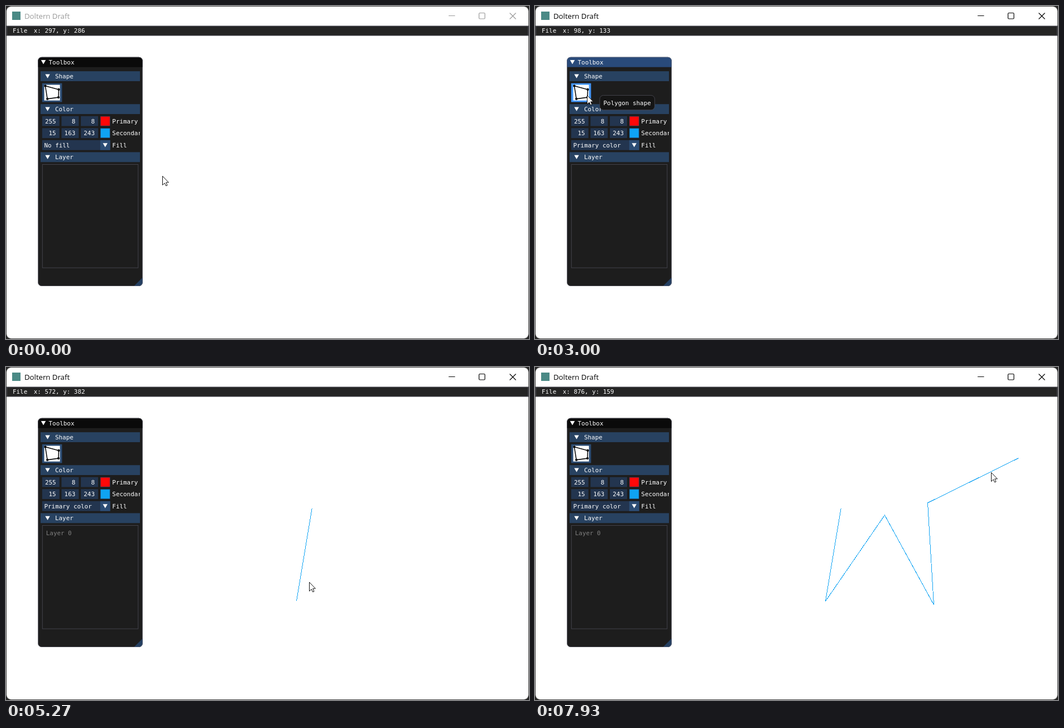
These frames come from a looping animation (937x598 px, 8 s). An HTML page:

```html
<!DOCTYPE html>
<html lang="en">
<head>
<meta charset="utf-8">
<title>Doltern Draft</title>
<style>
  html, body { margin: 0; width: 100%; height: 100%; overflow: hidden; background: #262626; }
  svg { display: block; width: 937px; height: 598px; }
  text { font: 11.63px "DejaVu Sans Mono", "Noto Sans Mono", monospace; fill: #fff; white-space: pre; }
  #chrome text { font: 13.2px "Open Sans", "Noto Sans", sans-serif; fill: currentColor; }
  #chrome { color: #999; }
  #chrome.on { color: #000; }
  .head { fill: #284261; }
  .head.hot { fill: #3b7ece; }
  .field { fill: #23354f; }
  .field.hot { fill: #2c4d75; }
  .btn { fill: #2c4d75; }
  .btn.hot { fill: #4296fa; }
  .edge { fill: none; stroke: rgba(110, 110, 128, .5); }
  .swatch { stroke: rgba(41, 74, 122, .54); }
  .over { fill: #151515; stroke: #46464f; }
  #caption { fill: #0a0a0a; }
  #caption.on { fill: #294a7a; }
  #pick { fill: none; }
  #pick.hot { fill: #397ccc; }
  #pick.down { fill: #4296fa; }
  #layer { fill: #808080; }
  #path { fill: none; stroke: #0fa3f3; shape-rendering: crispEdges; }
  .off { display: none; }
</style>
</head>
<body>
<svg viewBox="0 0 937 598">
  <defs>
    <clipPath id="inner"><rect x="60" y="60" width="195" height="438"/></clipPath>
    <path id="down" fill="#fff" d="M-4.5-3.9h9l-4.5 7.8z"/>
  </defs>
  <rect x="1" y="1" width="935" height="596" rx="8" fill="#fff"/>

  <g id="chrome">
    <rect x="11" y="10" width="15" height="15" fill="#4b8a86"/>
    <text x="33" y="23">Doltern Draft</text>
    <g fill="none" stroke="currentColor" stroke-width="1.2">
      <path d="M793 17.5h11.5M902.5 12.5l11 11M913.5 12.5l-11 11"/>
      <rect x="847.5" y="12.5" width="10.5" height="10.5" rx="1.5"/>
    </g>
  </g>

  <polyline id="path"/>

  <g transform="translate(1 35.6) scale(.9375)">
    <rect width="997.3" height="19" fill="#242424"/>
    <rect class="edge" x=".5" y=".5" width="996.3" height="18"/>
    <text x="11.7" y="13.7">File</text>
    <text id="status" x="52" y="13.7"></text>

    <rect x="60" y="60" width="200" height="438.5" rx="7" fill="#1d1d1d"/>
    <path id="caption" d="M60 79V67a7 7 0 0 1 7-7h186a7 7 0 0 1 7 7v12z"/>
    <path d="M260 482v9.5a7 7 0 0 1-7 7h-9.5z" fill="#243f61"/>
    <rect class="edge" x="60.5" y="60.5" width="199" height="437.5" rx="6.5"/>
    <use href="#down" x="70.4" y="69.5"/>
    <text x="80.6" y="73.7">Toolbox</text>

    <g id="tools" clip-path="url(#inner)"></g>

    <g id="popup">
      <rect class="over" x="68.5" y="238.5" width="129" height="44"/>
      <rect x="69" y="244" width="128" height="17" fill="#233d5c"/>
      <rect id="pick" x="69" y="261" width="128" height="17"/>
      <text x="72" y="256.4">No fill</text>
      <text x="72" y="273.6">Primary color</text>
    </g>
  </g>

  <g id="tip">
    <rect class="over" x="24.5" y=".5" width="105" height="28" rx="7"/>
    <text x="31.5" y="18.7">Polygon shape</text>
  </g>

  <path id="mouse" d="M.5 .5V16.6L4.2 13 6.6 18 9 17 6.7 11.9H11.4z" fill="#fff" stroke="#111"/>
  <rect x=".5" y=".5" width="936" height="597" rx="8" fill="none" stroke="#3c3c3c"/>
</svg>

<script>
const LOOP = 8000, FPS = 15, LAG = 13, SCALE = .9375;
const $ = id => document.getElementById(id);
const hotspots = [];

function add(name, attrs, text) {
  const el = document.createElementNS('http://www.w3.org/2000/svg', name);
  for (const key in attrs) el.setAttribute(key, attrs[key]);
  if (text) el.textContent = text;
  $('tools').append(el);
  return el;
}
const label = (x, y, text, id = '') => add('text', { x, y: y + 13.7, id }, text);
const arrow = (x, y) => add('use', { href: '#down', x, y: y + 9.5 });

function box(kind, x, y, width, height = 19) {
  const el = add('rect', { class: kind, x, y, width, height });
  hotspots.push({ el, x, y, r: x + width, b: y + height });
  return el;
}
function header(y, text) {
  box('head', 65, y, 190);
  arrow(78.4, y);
  label(92.8, y, text);
}
function colorRow(y, rgb, name) {
  rgb.forEach((v, i) => {
    const x = 68 + i * 37;
    box('field', x, y, 33);
    label(x + 5.5, y, String(v).padStart(3));
  });
  add('rect', { class: 'swatch', x: 179.5, y: y + .5, width: 18, height: 18, fill: `rgb(${rgb})` });
  label(202, y, name);
}

header(87, 'Shape');
const shape = box('btn', 68, 110, 38, 36);
add('rect', { x: 72, y: 113, width: 30, height: 30, fill: '#fff' });
const corners = [[74, 115], [99.7, 122], [99.2, 137], [78, 140]];
add('polygon', { points: corners.join(' '), fill: 'none', stroke: '#000', 'stroke-width': 1.6 });
corners.forEach(([cx, cy]) => add('circle', { cx, cy, r: 2.3 }));

header(150, 'Color');
colorRow(173, [255, 8, 8], 'Primary');
colorRow(196, [15, 163, 243], 'Secondary');
const combo = box('field', 68, 219, 130);
const comboBtn = add('rect', { class: 'btn', x: 179, y: 219, width: 19, height: 19 });
arrow(188.5, 219);
label(72, 219, 'No fill', 'fill');
label(202, 219, 'Fill');
header(242, 'Layer');
add('rect', { class: 'edge', x: 68.5, y: 265.5, width: 183, height: 198 });
label(75.5, 270, 'Layer 0', 'layer');

// Each gesture eases the pointer to a point between two moments.
const rest = [280, 305.2];
const gestures = [
  { from: 0, to: 50, at: [289, 307] },
  { from: 250, to: 930, at: [176.4, 247.4] },
  { from: 1500, to: 1730, at: [158, 288.4] },
  { from: 2390, to: 2560, at: [116.4, 196] },
  { from: 2560, to: 3150, at: [88.55, 153.6] },
  { from: 3250, to: 4050, at: [548.5, 253.5] },
  { from: 4110, to: 4260, at: [488, 386] },
  { from: 4270, to: 4540, at: [590, 406] },
  { from: 4540, to: 4790, at: [520.5, 420.5] },
  { from: 5185, to: 5455, at: [626.5, 266] },
  { from: 5915, to: 6250, at: [714.5, 427] },
  { from: 6340, to: 6530, at: [763, 350] },
  { from: 6530, to: 6740, at: [728, 262] },
  { from: 6740, to: 6990, at: [703.5, 244] },
  { from: 7250, to: 7680, at: [866.5, 163.5] },
  { from: 7800, to: 7980, at: [807.5, 194.5] }
];
const ease = p => p * p * (3 - 2 * p);
const clamp = p => Math.min(1, Math.max(0, p));

function pointer(t) {
  return gestures.reduce((pos, { from, to, at }) => {
    const p = ease(clamp((t - from) / (to - from)));
    return pos.map((v, i) => v + (at[i] - v) * p);
  }, rest);
}

// Every click drops a vertex where the pointer is.
const clicks = [4130, 5000, 5670, 6270, 7130, 7730];
const vertices = clicks.map(t => pointer(Math.min(t, t - LAG)));
const show = (el, on) => el.classList.toggle('off', !on);

function draw(ms) {
  const frame = Math.floor((ms % LOOP + 4) * FPS / 1000) % (LOOP * FPS / 1000);
  const t = frame * 1000 / FPS;
  const after = time => t + 4 >= time;
  const [x, y] = pointer(t).map(Math.floor);
  const [sx, sy] = pointer(t - LAG);
  const u = (x - 1) / SCALE, v = (y - 35.6) / SCALE;
  const open = after(1270) && !after(2200);

  $('status').textContent =
    `x: ${Math.floor((sx - 1) / SCALE)}, y: ${Math.floor((sy - 36.8) / SCALE)}`;
  $('mouse').setAttribute('transform', `translate(${x} ${y})`);
  $('chrome').classList.toggle('on', after(1130));
  $('caption').classList.toggle('on', after(1130) && !after(4070));

  for (const h of hotspots)
    h.el.classList.toggle('hot', !open && u >= h.x && u < h.r && v >= h.y && v < h.b);
  comboBtn.classList.toggle('hot', open || combo.classList.contains('hot'));

  show($('popup'), open);
  $('pick').classList.toggle('hot', v >= 261 && v < 278);
  $('pick').classList.toggle('down', after(2070));
  $('fill').textContent = after(2200) ? 'Primary color' : 'No fill';

  show($('tip'), shape.classList.contains('hot'));
  $('tip').setAttribute('transform', `translate(${x} ${y}) scale(${SCALE})`);
  show($('layer'), after(clicks[0]));
  $('path').setAttribute('points', vertices.filter((_, i) => after(clicks[i])).join(' '));
}

const start = performance.now();
function tick() {
  draw(performance.now() - start);
  requestAnimationFrame(tick);
}
tick();
</script>
</body>
</html>
```
